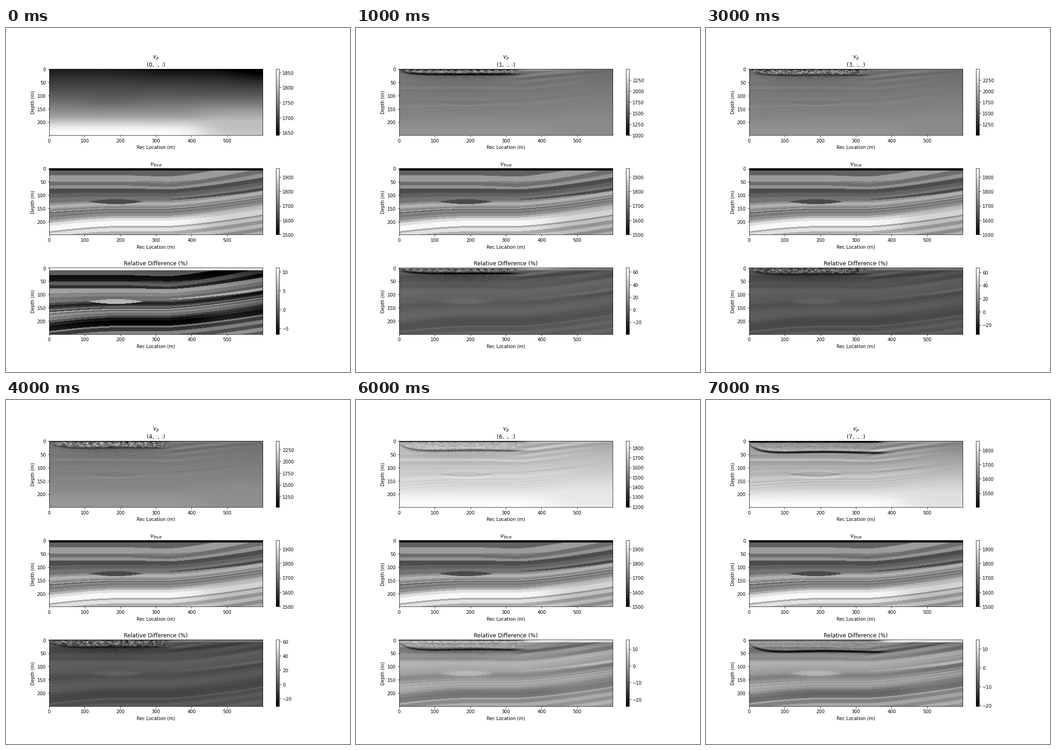
Write a matplotlib script that moves like this. It is 748 px wide and 748 px high and loops after 8 s.

```python
import numpy as np
import matplotlib.pyplot as plt
from matplotlib.animation import FuncAnimation

NZ, NX, FRAMES = 250, 600, 8
WATER = 10
x = np.arange(NX, dtype=float)
z = np.arange(NZ, dtype=float)[:, None]


def sigmoid(t):
    return 1 / (1 + np.exp(-np.clip(t, -40, 40)))


def bell(t):
    return np.exp(-t ** 2)


def smooth(a, sigma, axis):
    """Gaussian blur along one axis."""
    r = int(3 * sigma) + 1
    k = bell(np.arange(-r, r + 1) / (sigma * 2 ** .5))
    k /= k.sum()
    return np.apply_along_axis(
        lambda row: np.convolve(np.pad(row, r, "edge"), k, "valid"), axis, a)


def boundary(depth):
    """Fold: tilt on the left, sag in the middle, rise on the right."""
    tilt = 20 * np.clip((depth - 80) / 130, 0, 1)
    rise = 43 + 18 * sigmoid((66 - depth) / 6)
    return (depth - tilt * np.sin(np.pi / 2 * np.clip(x / 210, 0, 1))
            + 7 * bell((depth - 50) / 40) * sigmoid((x - 275) / 25)
            - rise * np.clip((x - 330) / 270, 0, 1) ** 1.35)


def step(line):
    return 2 * np.round(line / 2)


# Top of each main layer at the left edge and its brightness
LAYERS = [(28, .61), (52, .43), (66, .57), (77, .30), (96, .38), (112, .45),
          (132, .57), (140, .69), (152, .60), (158, .48), (162, .65),
          (167, .39), (172, .56), (177, .47), (186, .55), (198, .69),
          (207, .87), (218, .97), (238, .66)]
DEEP = [(244 + 14 * k, .79 + .09 * (-1) ** k - .02 * k) for k in range(5)]


def true_model():
    g = np.full((NZ, NX), .38)
    for depth, level in LAYERS + DEEP:
        dim = 1 - .15 * sigmoid((x - 430) / 25) * (depth > 200)
        g = np.where(z >= step(boundary(depth)), level * dim, g)

    def fill(top, bottom, level):
        g[(z >= step(top)) & (z < step(bottom))] = level

    wedge = 8 * np.sin(np.pi * np.clip((x - 215) / 215, 0, 1))
    base = boundary(53)
    fill(base - wedge, base, .50)
    seam = boundary(124)
    fill(seam, seam + 10 * np.clip((x - 290) / 260, 0, 1), .28)
    lens = np.clip(1 - ((x - 187) / 76) ** 2, 0, 1)
    fill(127 - 9 * lens, 127 + 9 * lens, .29)
    v = 1500 + 460 * g
    v[:WATER] = 1500
    return v


def start_model():
    g = np.interp(z, [0, 50, 100, 150, 180, 205, 228, 250],
                  [.10, .24, .36, .52, .62, .82, .97, 1.0])
    g = smooth(np.repeat(g, NX, 1), 8, 0)
    right = sigmoid((x - 430) / 25)
    g -= .08 * sigmoid((x - 250) / 30) * np.exp(-z / 40)
    g -= .10 * bell((x - 600) / 90) * bell(z / 60)
    g -= .04 * bell((x - 170) / 90) * bell((z - 125) / 30)
    g += .06 * right * bell((z - 165) / 35)
    g -= .22 * right * sigmoid((z - 208) / 8)
    return 1641 + 221 * np.clip(g, 0, 1)


TRUE = true_model()
START = start_model()
REFLECT = smooth(TRUE, 1.5, 0) - smooth(TRUE, 7, 0)


def limits(n):
    """Colour ranges of the velocity and of the relative difference."""
    t = (n - 1) / 6
    if n == 0:
        low, high, cap, d_low = 1641, 1862, 1666, -6.5
    else:
        fall = sigmoid((4.62 - n) * 3.48)
        low, high = 1000 + 402 * t ** 4, 1864 + 635 * fall
        cap = min(high, 1722 + 1310 * fall)
        d_low = -39 + 18.6 * t ** 1.2
    return (low, high), (d_low, 100 * (cap / 1500 - 1))


def velocity(n):
    if n == 0:
        return START
    t = (n - 1) / 6
    depth = 21 + 23 * t ** 2
    end = 325 + 47 * t ** 4
    lit = sigmoid((end - x) / 8)
    mid = depth * (1 - .65 * np.exp(-x / 25)) + 1.5 * t * np.sin(x / 45)
    rng = np.random.default_rng(n)
    grain = smooth(smooth(rng.normal(size=(NZ, NX)), .9, 0), 1.7, 1)
    grain /= grain.std()

    v = START + .85 * REFLECT * sigmoid((z - 45) / 8) \
        * sigmoid((185 - z) / 15) * sigmoid((470 - x) / 40)
    # Dark band with a soft rim and a fading trail below
    band = (200 + 420 * (1 - t) ** 3 + 90 * t ** 4) \
        * sigmoid((end - x) / 12) * (1 - .8 * np.exp(-x / 30))
    v += band * (.15 * bell((z - mid + 9) / 4.5) - bell((z - mid) / 4))
    bowl = np.sin(np.pi * np.clip(x / 340, 0, 1)) ** .6
    below = np.where(z > mid, np.exp(-(z - mid) / (20 * bowl + 2)), 0)
    v -= 150 * (1 - t ** 3) * below * bowl * (1 + .35 * grain)
    # Grain above the band, surface strip and source marks
    noise = 13 + 220 * (.5 + t) * sigmoid((.62 - t) / .08)
    v += noise * grain * lit * sigmoid((mid - 2 - z) / 2)
    surface = 1040 * (1 - t) ** 2.5 - 240
    v += surface * lit * sigmoid((3 + 5 * t ** 3 - z) * 2)
    marks = 400 * np.cos(2 * np.pi * x / 21) * bell((z - 7) / 1.5) \
        - 800 * bell((z - 4.5) / 1.2) * (1 + .4 * grain)
    v += (1 - t) * lit * marks
    # Arcs rising to the right
    u = np.clip((x - 330) / 270, 0, 1)
    arc = (.6 * depth + 18) * (1 - u) ** 1.2 + 3
    side = sigmoid((x - 335) / 10) * (1 - u) ** .7
    v += (85 + 45 * (1 - t)) * side * bell((z - arc) / 20) \
        * np.cos(2 * np.pi * (z - arc + 4) / 22)
    glow = 110 + 640 * (1 - t) ** 4
    v += glow * np.exp(-z / 5) * bell((x - 398 - 78 * t) / 75) * (1 - lit)
    return np.clip(v, *limits(n)[0])


def difference(v):
    return 100 * (v - TRUE) / TRUE


fields = [velocity(n) for n in range(FRAMES)]

plt.rcParams["font.family"] = "DejaVu Sans"
# The canvas drops the fraction of a pixel: 748 by 748
fig, axes = plt.subplots(3, 1, figsize=(10.4, 10.4), dpi=72)
fig.subplots_adjust(left=.125, right=.9, bottom=.11, top=.88, hspace=.5)


def panel(ax, data, title, clim):
    im = ax.imshow(data, cmap="gray", aspect="auto",
                   vmin=clim[0], vmax=clim[1])
    ax.set(title=title, xlabel="Rec Location (m)", ylabel="Depth (m)")
    fig.colorbar(im, ax=ax)
    return im


v_lim, d_lim = limits(0)
vp = panel(axes[0], fields[0], "$v_p$\n(0, :, :)", v_lim)
panel(axes[1], TRUE, "$v_{true}$", (1500, 1959))
diff = panel(axes[2], difference(fields[0]), "Relative Difference (%)", d_lim)


def update(n):
    v_lim, d_lim = limits(n)
    vp.set_data(fields[n])
    vp.set_clim(*v_lim)
    diff.set_data(difference(fields[n]))
    diff.set_clim(*d_lim)
    axes[0].set_title(f"$v_p$\n({n}, :, :)")
    return vp, diff


anim = FuncAnimation(fig, update, frames=FRAMES, interval=1000,
                     repeat=True, repeat_delay=0)
plt.show()
```
